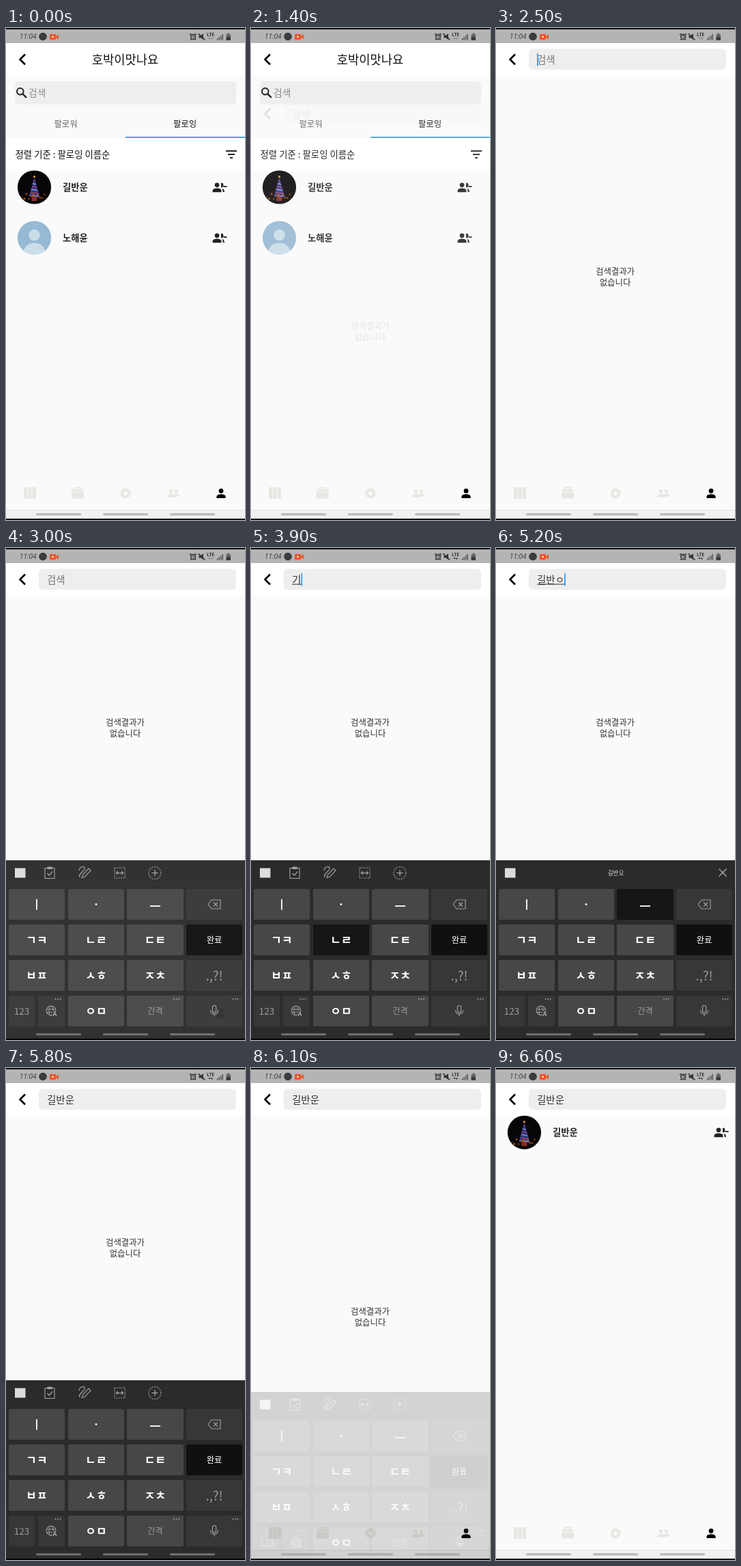
These frames come from a looping animation (350x720 px, 8.5 s). An HTML page with a canvas:

```html
<!DOCTYPE html>
<html lang="ko">
<head>
<meta charset="utf-8">
<title>팔로잉 검색</title>
<style>
html, body { margin: 0; width: 100%; height: 100%; overflow: hidden; background: #fafafa; }
canvas { display: block; width: 350px; height: 720px; }
</style>
</head>
<body>
<canvas id="stage"></canvas>
<script>
const W = 350, H = 720, LOOP = 8500, STEP = 100;
const SANS = '"Noto Sans CJK KR", "Noto Sans CJK", "Noto Sans", sans-serif';
const NAME = '길반운';
const dpr = window.devicePixelRatio || 1;

function makeLayer(canvas) {
  canvas.width = W * dpr;
  canvas.height = H * dpr;
  const ctx = canvas.getContext('2d');
  ctx.scale(dpr, dpr);
  return ctx;
}
const screen = makeLayer(document.getElementById('stage'));
const buffer = makeLayer(document.createElement('canvas'));
let g = screen;

// Draws into the spare layer, then blends it as one picture.
function blend(alpha, dy, draw) {
  if (alpha <= 0) return;
  buffer.clearRect(0, 0, W, H);
  g = buffer;
  draw();
  g = screen;
  g.globalAlpha = alpha;
  g.drawImage(buffer.canvas, 0, dy, W, H);
  g.globalAlpha = 1;
}

function rect(x0, y0, x1, y1, color, r = 0) {
  g.fillStyle = color;
  g.beginPath();
  g.roundRect(x0, y0, x1 - x0, y1 - y0, r);
  g.fill();
}
function disc(x, y, r, color) {
  g.fillStyle = color;
  g.beginPath();
  g.arc(x, y, r, 0, Math.PI * 2);
  g.fill();
}
function ring(x, y, r, color, w = 1) {
  g.strokeStyle = color;
  g.lineWidth = w;
  g.beginPath();
  g.arc(x, y, r, 0, Math.PI * 2);
  g.stroke();
}
function line(color, w, ...p) {
  g.strokeStyle = color;
  g.lineWidth = w;
  g.beginPath();
  for (let i = 0; i < p.length; i += 2) g.lineTo(p[i], p[i + 1]);
  g.stroke();
}
function poly(color, ...p) {
  g.fillStyle = color;
  g.beginPath();
  for (let i = 0; i < p.length; i += 2) g.lineTo(p[i], p[i + 1]);
  g.fill();
}
// y is the visual middle of the text.
function text(s, x, y, size, color, weight = 400, align = 'left') {
  g.font = `${weight} ${size}px ${SANS}`;
  g.fillStyle = color;
  g.textAlign = align;
  g.fillText(s, x, y + size * 0.38);
  return g.measureText(s).width;
}

// ---- system bars ----
function alarm(x) {
  ring(x, 13, 3.4, '#333', 1.6);
  line('#333', 1.4, x - 5, 10, x - 2.5, 8);
  line('#333', 1.4, x + 5, 10, x + 2.5, 8);
  line('#333', 1, x, 11, x, 13.4, x + 1.8, 13.4);
  line('#333', 1.2, x - 4, 17.5, x - 2.5, 16);
  line('#333', 1.2, x + 4, 17.5, x + 2.5, 16);
}
function mute(x) {
  poly('#333', x - 4, 11, x - 1, 11, x + 2.5, 8, x + 2.5, 17, x - 1, 14.5, x - 4, 14.5);
  line('#333', 1.5, x - 5, 8, x + 5, 17.5);
}
function pin(x) {
  poly('#333', x - 3.7, 12, x + 3.7, 12, x, 18);
  disc(x, 11, 3.9, '#333');
  disc(x, 11, 1.5, '#b4b4b4');
}
function statusBar(t) {
  rect(0, 0, W, 22, '#b4b4b4');
  g.font = 'italic 10px "Noto Sans", sans-serif';
  g.fillStyle = '#444';
  g.textAlign = 'left';
  g.fillText('11:04', 20, 16.3);
  disc(54, 12.5, 5.8, '#3c3c3c');
  rect(64, 9, 73, 17, '#ee5426', 1);
  poly('#ee5426', 72, 13, 77, 9.5, 77, 16.5);
  disc(68.5, 13, 1.4, '#f6d5c8');

  const located = t >= 4400 && t < 5000;
  const shift = located ? -12 : 0;
  alarm(274 + shift);
  mute(286.5 + shift);
  if (located) pin(286.5);
  g.font = '700 6.5px "Noto Sans", sans-serif';
  g.textAlign = 'center';
  g.fillStyle = '#333';
  g.fillText('LTE', 299.5, 12);
  const arrows = t >= 3200 ? '#444' : '#8c8c8c';
  poly(arrows, 296, 16, 298, 13.2, 300, 16);
  poly(arrows, 299.5, 14.5, 303.5, 14.5, 301.5, 17.3);
  for (let i = 0; i < 4; i++) rect(309 + i * 2.5, 15 - i * 2, 310.5 + i * 2.5, 17.5, '#555');
  rect(322.5, 9, 329, 18, '#666', 1);
  rect(324.3, 7.5, 327.2, 9, '#666');
  rect(322.5, 13, 329, 18, '#3c3c3c', 1);
}
function pills(color) {
  for (const x of [44, 142, 240]) rect(x, 710.2, x + 66, 713.2, color, 1.5);
}
function edges() {
  rect(0, 0, W, 2, '#000');
  rect(0, 718, W, H, '#000');
}

// ---- shared icons ----
function person(x, y, s, color) {
  disc(x, y - 3.6 * s, 3.4 * s, color);
  g.fillStyle = color;
  g.beginPath();
  g.moveTo(x - 6.6 * s, y + 7 * s);
  g.lineTo(x - 6.6 * s, y + 4.6 * s);
  g.bezierCurveTo(x - 6 * s, y, x + 6 * s, y, x + 6.6 * s, y + 4.6 * s);
  g.lineTo(x + 6.6 * s, y + 7 * s);
  g.fill();
}
function unfollow(x, y) {
  const c = '#222';
  g.fillStyle = c;
  g.beginPath();
  g.arc(x + 13, y - 3, 3.4, -Math.PI / 2, Math.PI / 2);
  g.fill();
  poly(c, x + 14, y + 2, x + 17, y + 3, x + 18, y + 7, x + 15.7, y + 7, x + 15.3, y + 4);
  person(x + 7, y + 0.4, 0.98, c);
  line(c, 1.8, x + 16.4, y - 1, x + 21.5, y - 1);
}
function navBar() {
  const c = '#e8e8e3', bg = '#fafafa';
  rect(0, 657, W, 705, bg);
  rect(26, 672, 44, 689, c, 1);
  line(bg, 1, 32, 672, 32, 689);
  line(bg, 1, 38, 672, 38, 689);
  rect(96, 675.5, 114, 688.5, c, 1.5);
  line(c, 2, 100, 676, 101, 673, 109, 673, 110, 676);
  line(bg, 0.8, 96, 679, 114, 679);
  disc(175, 681, 7.6, c);
  line(bg, 1.8, 175, 677, 175, 685);
  line(bg, 1.8, 171, 681, 179, 681);
  person(249.5, 680.5, 0.75, c);
  person(241.5, 681, 0.85, c);
  person(315, 681, 1, '#000');
  rect(0, 705, W, 718, '#f1f1f1');
  rect(0, 705, W, 706, '#e2e2e2');
}
function backArrow() {
  line('#000', 2.5, 28, 38.5, 20.5, 46, 28, 53.5);
}

// ---- avatars and rows ----
function towerAvatar(x, y) {
  g.save();
  g.beginPath();
  g.arc(x, y, 24.6, 0, Math.PI * 2);
  g.clip();
  rect(x - 25, y - 25, x + 25, y + 25, '#080508');
  poly('#2c3a86', x, y - 15, x + 8, y + 14, x - 8, y + 14);
  for (let i = 0; i < 6; i++) {
    const h = 1 + i * 1.15, cy = y - 10 + i * 4.4;
    line(i % 2 ? '#b9a8d8' : '#c0364e', 1.2, x - h, cy, x + h, cy + 1.5);
  }
  disc(x, y - 15.5, 1.6, '#f0903a');
  for (let i = 0; i < 12; i++) {
    const cx = x - 18 + i * 3.3, cy = y + 14 + 4 * Math.sin(i * 2.4);
    disc(cx, cy, 1.1 + (i % 3) * 0.4, i % 2 ? '#a85a1c' : '#6b3212');
  }
  rect(x - 4, y + 14, x + 4, y + 20, '#8a2c22');
  g.restore();
}
function plainAvatar(x, y) {
  g.save();
  g.beginPath();
  g.arc(x, y, 24.6, 0, Math.PI * 2);
  g.clip();
  rect(x - 25, y - 25, x + 25, y + 25, '#96b9d4');
  disc(x, y - 4, 8.3, '#cbdde9');
  g.fillStyle = '#cbdde9';
  g.beginPath();
  g.ellipse(x, y + 20, 15.5, 12.5, 0, 0, Math.PI * 2);
  g.fill();
  g.restore();
}
function row(name, y, iconX) {
  text(name, 83, y, 13.3, '#222', 700);
  unfollow(iconX, y);
}

// ---- pages ----
function listPage() {
  rect(0, 22, W, 657, '#fafafa');
  rect(0, 22, W, 70, '#fff');
  backArrow();
  text('호박이맛나요', 174.5, 46, 17.7, '#111', 500, 'center');
  rect(13, 78, 337, 112, '#eee', 6);
  ring(20.8, 92.8, 4.8, '#222', 2);
  line('#222', 2.4, 24.3, 96.3, 30, 102);
  text('검색', 33, 94.5, 13.8, '#8a8a8a');
  text('팔로워', 87.5, 140, 12.4, '#666', 400, 'center');
  text('팔로잉', 262, 140, 12.4, '#111', 400, 'center');
  rect(175, 159, W, 161, '#4ba3dc');
  rect(0, 161, W, 209, '#fff');
  text('정렬 기준 : 팔로잉 이름순', 13.5, 185, 13.4, '#111');
  [8, 5, 2].forEach((h, i) => line('#111', 1.8, 330 - h, 180 + i * 5, 330 + h, 180 + i * 5));
  towerAvatar(41.5, 233);
  row(NAME, 233, 302);
  plainAvatar(41.5, 307);
  row('노해윤', 307, 302);
}

const TYPED = [
  [3600, 'ㄱ'], [3800, '기'], [4000, '긴'], [4200, '길'], [4400, '길ㅂ'], [4600, '길비'],
  [4800, '길바'], [5000, '길반'], [5200, '길반ㅇ'], [5300, '길반으'], [5500, '길반우'], [5700, NAME]
];
const valueAt = t => TYPED.reduce((s, [at, v]) => t >= at ? v : s, '');
const cursorOn = t => (t >= 2500 && t < 3000) || (t >= 3300 && t < 5800);

function searchPage(t) {
  rect(0, 22, W, 657, '#fafafa');
  rect(0, 22, W, 70, '#fff');
  backArrow();
  rect(48, 30.5, 337, 61, '#eee', 6);
  const value = valueAt(t);
  let w = 0;
  if (value) w = text(value, 60, 46, 14.5, '#333');
  else text('검색', 60, 46, 14.5, '#777');
  if (value && t < 5800) rect(60, 52.6, 60 + w, 53.6, '#333');
  if (cursorOn(t)) rect(60 + w, 37, 61.8 + w, 55.5, '#3d9be6');

  if (t < 6300) {
    const y = t >= 2900 && t < 6000 ? 255 : 356;
    text('검색결과가', 174.5, y, 12.4, '#333', 400, 'center');
    text('없습니다', 174.5, y + 15.8, 12.4, '#333', 400, 'center');
  } else {
    row(NAME, 94, 319);
    if (t >= 6500) {
      g.globalAlpha = t < 6600 ? 0.5 : 1;
      towerAvatar(41.5, 94.3);
      g.globalAlpha = 1;
    }
  }
}

// ---- keyboard ----
const COLS = [[4, 86], [91, 173], [177, 260], [264, 346]];
const ROWS = [[499, 544], [551, 596], [603, 648], [655, 700]];
const KEYS = [
  ['ㅣ', 'ㆍ', 'ㅡ', 'del'],
  ['ㄱㅋ', 'ㄴㄹ', 'ㄷㅌ', '완료'],
  ['ㅂㅍ', 'ㅅㅎ', 'ㅈㅊ', '.,?!'],
  ['', 'ㅇㅁ', '간격', 'mic']
];
const PRESSES = [
  [3500, 3600, 'ㄱㅋ'], [3700, 3800, 'ㅣ'], [3900, 4000, 'ㄴㄹ'], [4100, 4200, 'ㄴㄹ'],
  [4300, 4400, 'ㅂㅍ'], [4500, 4600, 'ㅣ'], [4700, 4800, 'ㆍ'], [4900, 5000, 'ㄴㄹ'],
  [5100, 5200, 'ㅇㅁ'], [5200, 5300, 'ㅡ'], [5400, 5500, 'ㆍ'], [5500, 5700, 'ㄴㄹ']
];
const GREY = '#9c9c9c';

function keyFace(label, x, y) {
  switch (label) {
    case 'ㅣ': return line('#fff', 1.8, x, y - 7.5, x, y + 8);
    case 'ㆍ': return disc(x, y, 1.4, '#fff');
    case 'ㅡ': return line('#fff', 1.8, x - 7.5, y + 2.5, x + 7.5, y + 2.5);
    case '완료': return text(label, x, y, 12.3, '#fff', 500, 'center');
    case '.,?!': return text(label, x, y, 18.5, GREY, 400, 'center');
    case '간격': return text(label, x, y, 12.3, GREY, 400, 'center');
    case 'del':
      line(GREY, 1.2, x - 9, y, x - 4, y - 6.5, x + 9, y - 6.5, x + 9, y + 6.5, x - 4, y + 6.5, x - 9, y);
      line(GREY, 1.2, x - 1, y - 3, x + 5, y + 3);
      return line(GREY, 1.2, x + 5, y - 3, x - 1, y + 3);
    case 'mic':
      g.strokeStyle = GREY;
      g.lineWidth = 1.2;
      g.beginPath();
      g.roundRect(x - 2.6, y - 8, 5.2, 10, 2.6);
      g.stroke();
      g.beginPath();
      g.arc(x, y - 1, 5.6, 0, Math.PI);
      g.stroke();
      return line(GREY, 1.2, x, y + 4.6, x, y + 8);
    default: return text(label, x, y, 17, '#fff', 700, 'center');
  }
}
function dots(x, y) {
  for (let i = 0; i < 3; i++) disc(x + i * 3.5, y, 0.9, '#a5a5a5');
}
function tools() {
  const c = '#a2a2a2';
  g.strokeStyle = c;
  g.lineWidth = 1.1;
  g.strokeRect(57, 468.5, 14, 15);
  rect(60.5, 466.5, 67.5, 470, c);
  line(c, 1.2, 60.5, 476, 63.3, 479, 68, 473.5);

  g.beginPath();
  g.moveTo(107, 472);
  g.bezierCurveTo(108, 465, 117, 465, 115, 470);
  g.bezierCurveTo(113, 474, 105, 478, 108, 482);
  g.stroke();
  line(c, 1.1, 111, 483, 112.5, 478, 121, 469, 124, 472, 115.5, 481, 111, 483);

  g.setLineDash([2, 1.4]);
  g.strokeRect(159, 468, 15, 15);
  ring(218, 475.5, 9, c, 1.1);
  g.setLineDash([]);
  line(c, 1.2, 161.5, 475.5, 171.5, 475.5);
  line(c, 1.2, 164, 473, 161.5, 475.5, 164, 478);
  line(c, 1.2, 169, 473, 171.5, 475.5, 169, 478);
  line(c, 1.3, 213.5, 475.5, 222.5, 475.5);
  line(c, 1.3, 218, 471, 218, 480);
}
function suggestions() {
  text('길반오', 175.5, 476, 8.6, '#ddd', 400, 'center');
  line('#b0b0b0', 1.2, 326.5, 469.5, 337.5, 480.5);
  line('#b0b0b0', 1.2, 337.5, 469.5, 326.5, 480.5);
}
function keyboard(t) {
  rect(0, 457, W, H, '#2b2b2b');
  rect(0, 492.5, W, 493.5, '#333');
  rect(13, 468.5, 28.5, 482.5, '#dcdcdc');
  if (t >= 4800 && t < 5500) suggestions();
  else tools();

  const down = PRESSES.find(([a, b]) => t >= a && t < b);
  KEYS.forEach((labels, r) => labels.forEach((label, c) => {
    if (!label) return;
    const [x0, x1] = COLS[c], [y0, y1] = ROWS[r];
    let color = c === 3 ? '#373737' : '#474747';
    if (label === '완료') color = '#101010';
    if (down && down[2] === label) color = '#161616';
    rect(x0, y0, x1, y1, color, 2);
    keyFace(label, (x0 + x1) / 2, (y0 + y1) / 2);
  }));

  rect(4, 655, 42.5, 700, '#373737', 2);
  rect(47, 655, 86, 700, '#373737', 2);
  text('123', 23, 677.5, 13.6, GREY, 400, 'center');
  ring(66, 677, 6.8, GREY, 1.1);
  g.beginPath();
  g.ellipse(66, 677, 3, 6.8, 0, 0, Math.PI * 2);
  g.stroke();
  line(GREY, 1, 59.5, 675, 72.5, 675);
  line(GREY, 1, 59.5, 679.5, 68, 679.5);
  rect(68, 678, 75, 686, '#373737');
  text('A', 71.5, 682, 8.5, '#b5b5b5', 700, 'center');
  dots(72.5, 660);
  dots(246, 660);
  dots(332.5, 660);
}

// Opacity and downward shift of the keyboard.
function keyboardPose(t) {
  if (t < 2800 || t >= 6300) return [0, 0];
  if (t < 3100) return [[0.3, 20], [0.8, 6], [0.965, 0]][(t - 2800) / STEP];
  if (t < 6000) return [1, 0];
  return [[0.7, 6], [0.18, 17], [0.03, 24]][(t - 6000) / STEP];
}

// ---- whole picture ----
function draw(t) {
  g = screen;
  g.lineCap = 'butt';
  rect(0, 0, W, H, '#fafafa');
  const p = Math.min(1, Math.max(0, (t - 1300) / 400));
  if (p < 1) listPage();
  if (p === 1) searchPage(t);
  else if (p > 0) {
    g.save();
    g.beginPath();
    g.rect(0, 22, W, 635);
    g.clip();
    blend(p * p * (2 - p), 159 * Math.pow(1 - p, 2.4), () => searchPage(t));
    g.restore();
  }
  navBar();
  const [alpha, dy] = keyboardPose(t);
  blend(alpha, dy, () => keyboard(t));
  const shade = Math.round(182 - 68 * alpha);
  pills(`rgb(${shade},${shade},${shade})`);
  statusBar(t);
  edges();
}

const start = performance.now();
function tick() {
  const t = (performance.now() - start) % LOOP;
  draw(Math.floor(t / STEP) * STEP);
  requestAnimationFrame(tick);
}
tick();
</script>
</body>
</html>
```
